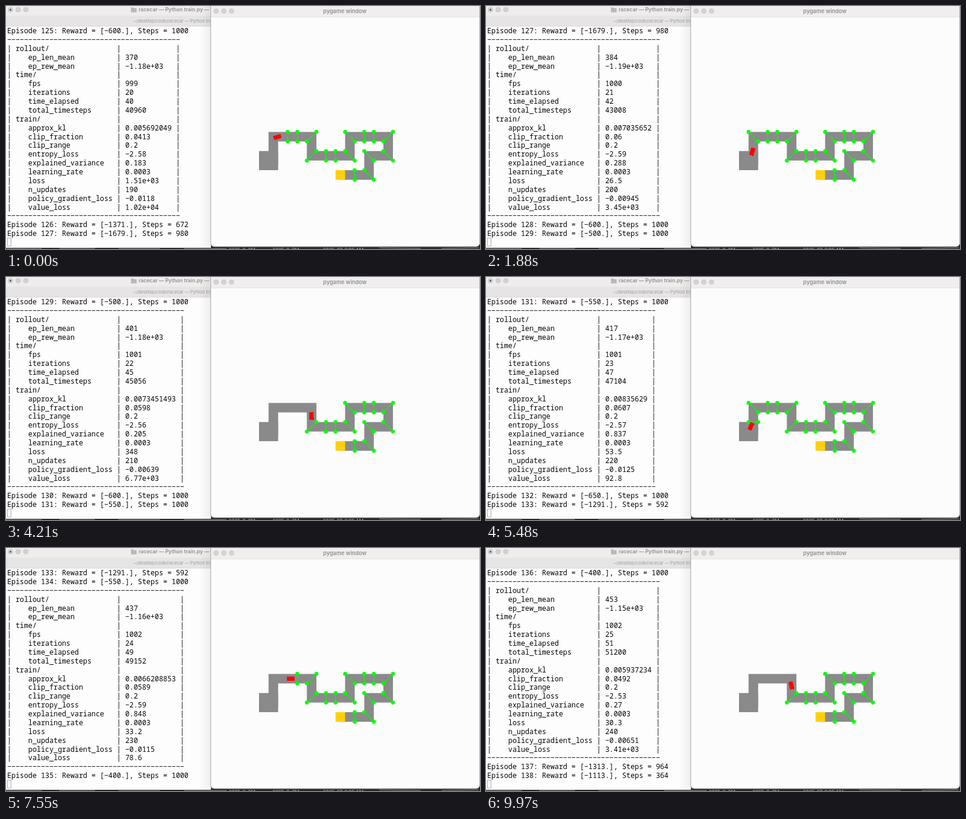
These frames come from a looping animation (800 by 410 pixels, 10000 ms). An HTML page:

```html
<!DOCTYPE html>
<html lang="en">
<head>
<meta charset="utf-8">
<title>Racecar training</title>
<style>
  html, body { margin: 0; width: 100%; height: 100%; overflow: hidden; background: #fdfdfd; }
  svg { position: absolute; left: 0; top: 0; width: 800px; height: 410px; }
  svg text { font-family: Inter, "Open Sans", sans-serif; }
  #term {
    position: absolute; left: 2px; top: 34.1px; margin: 0; width: 340px;
    font: 500 11.86px/14.87px "Noto Sans Mono", "DejaVu Sans Mono", monospace;
    color: #050505; white-space: pre;
  }
</style>
</head>
<body>
<svg viewBox="0 0 800 410">
  <defs>
    <linearGradient id="shade">
      <stop offset="0" stop-color="#000" stop-opacity="0"/>
      <stop offset="1" stop-color="#000" stop-opacity=".06"/>
    </linearGradient>
    <clipPath id="left"><rect width="346" height="410"/></clipPath>
  </defs>

  <!-- desktop behind the windows -->
  <rect width="800" height="410" fill="#29282b"/>
  <path d="M0 409.5H60M90 409H150M190 409.6H260M300 409.4H372M630 408L700 409M735 409L798 408" fill="none" stroke="#8b898c"/>
  <text y="414" font-size="8" fill="#bbb">
    <tspan x="376">2025-0..0M</tspan><tspan x="450">2025-0..0M</tspan><tspan x="535">2025-07..2:05 AM</tspan>
  </text>

  <!-- terminal window -->
  <g clip-path="url(#left)">
    <path d="M0 0H346V408H0Z" fill="#fdfdfd"/>
    <rect width="346" height="34" fill="#eeecec"/>
    <rect y="16.5" width="346" height="17" fill="#e6e4e4"/>
    <path d="M0 34H346" stroke="#d4d2d2"/>
    <g fill="#d2d0d0" stroke="#bebcbc" stroke-width=".6">
      <circle cx="7.5" cy="6.2" r="4"/><circle cx="20.4" cy="6.2" r="4"/><circle cx="33.4" cy="6.2" r="4"/>
    </g>
    <circle cx="7.5" cy="6.2" r="1.5" fill="#555"/>
    <path d="M211 2.5h4l1 1.2h4.5v7H211z" fill="#b9b7b7"/>
    <text x="224" y="9.4" font-size="8.6" font-weight="600" fill="#908e8e">racecar — Python train.py — 80×25</text>
    <text x="215" y="27.6" font-size="7.35" fill="#9b9999">~/desktop/code/racecar — Python train.py</text>
    <rect x="326" width="20" height="408" fill="url(#shade)"/>
    <rect x="2.5" y="391.5" width="6" height="13.5" fill="none" stroke="#aaa"/>
  </g>

  <!-- game window -->
  <rect x="345.5" y="-8" width="454" height="414" rx="6" fill="#fcfcfc" stroke="#a9a7a7"/>
  <path d="M346 0H799V18.5H346Z" fill="#f0eeee"/>
  <path d="M346 18.5H799" stroke="#dddbdb" stroke-width=".8"/>
  <g fill="#d4d2d2" stroke="#c2c0c0" stroke-width=".6">
    <circle cx="354.6" cy="8.6" r="4"/><circle cx="367.6" cy="8.6" r="4"/><circle cx="380.6" cy="8.6" r="4"/>
  </g>
  <text x="572" y="11.8" font-size="9.3" font-weight="600" text-anchor="middle" fill="#918f8f">pygame window</text>
  <path id="road" fill="none" stroke="#8a8a8a" stroke-width="16.15"/>
  <rect x="427" y="244.7" width="32.3" height="32.3" fill="#8a8a8a"/>
  <rect x="556.2" y="277" width="16.15" height="16.15" fill="#ffd00a"/>
  <path id="line" fill="none"/>
  <g id="gates" fill="#0f0"></g>
  <rect id="car" x="-6.5" y="-3.6" width="13" height="7.2" fill="#f00" shape-rendering="crispEdges"/>
</svg>
<pre id="term"></pre>

<script>
const LOOP = 10000, ROWS = 24, ROLLOUT = 2048, CELL = 16.15;
const $ = id => document.getElementById(id);
const toPx = ([c, r]) => [427 + c * CELL, 212.4 + r * CELL];
const along = (a, b, d) => {
  const k = d / Math.hypot(b[0] - a[0], b[1] - a[1]);
  return [a[0] + (b[0] - a[0]) * k, a[1] + (b[1] - a[1]) * k];
};

// cell centres where the road turns, from start to goal
const turns = [[1, 3], [1, 0], [5, 0], [5, 2], [9, 2], [9, 0], [13, 0], [13, 2], [11, 2], [11, 4], [8, 4]]
  .map(p => p.map(v => v + .5));
$("road").setAttribute("d", "M" + turns.map(toPx).join("L"));

// the car leaves the middle of the start block and rounds each turn
const route = [[1, 3], [1.5, 1.9], ...turns.slice(1)];
const dist = (a, b) => Math.hypot(a[0] - b[0], a[1] - b[1]);
let d = "M" + toPx(route[0]);
for (let i = 1; i < route.length - 1; i++) {
  const [a, b, c] = route.slice(i - 1, i + 2);
  const r = Math.min(1, dist(a, b) / 2, dist(b, c) / 2);
  d += `L${toPx(along(b, a, r))}Q${toPx(b)} ${toPx(along(b, c, r))}`;
}
const line = $("line");
line.setAttribute("d", d + "L" + toPx(route.at(-1)));

// where the driving line comes closest to a point
function nearest([x, y]) {
  let best = 0, min = Infinity;
  for (let s = 0; s < line.getTotalLength(); s++) {
    const p = line.getPointAtLength(s), gap = Math.hypot(p.x - x, p.y - y);
    if (gap < min) [best, min] = [s, gap];
  }
  return best;
}

// a gate crosses the road at (c, r); (dc, dr) is half its span
const gates = [];
function addGate(c, r, dc, dr) {
  const a = toPx([c - dc, r - dr]), b = toPx([c + dc, r + dr]);
  const node = document.createElementNS("http://www.w3.org/2000/svg", "g");
  node.innerHTML = `<path d="M${a}L${b}" stroke="#0f0" stroke-width="1.2"/>` +
    [a, b].map(([x, y]) => `<circle cx="${x}" cy="${y}" r="3.3"/>`).join("");
  $("gates").append(node);
  gates.push({ node, at: nearest(toPx([c, r])) });
}
for (let i = 0; i < turns.length - 1; i++) {
  const [a, b, next] = turns.slice(i, i + 3), len = dist(a, b);
  const [dc, dr] = along([0, 0], [b[0] - a[0], b[1] - a[1]], 1);
  for (let k = 1.5; k < len - 1; k++) addGate(a[0] + dc * k, a[1] + dr * k, dr / 2, dc / 2);
  if (next) {
    const [nc, nr] = along([0, 0], [next[0] - b[0], next[1] - b[1]], 1);
    addGate(...b, (dc - nc) / 2, (dr - nr) / 2);
  }
}

// policy updates, in ms: stepping stops between rollouts
const pauses = [[-1400, -1296], [600, 700], [2640, 2790], [4730, 4850], [6600, 6700], [8640, 8910], [10807, 10900]];
function stepAt(t) {
  const i = pauses.findIndex(p => t < p[1]);
  const from = pauses[i - 1][1], to = pauses[i][0];
  return (i - 1 + Math.min(1, (t - from) / (to - from))) * ROLLOUT;
}

// reward, steps, how strongly the car slows down
const episodes = [
  [-600, 1000, 1.68], [-500, 1000, 1.3], [-600, 1000, 1.76], [-550, 1000, 1.3], [-650, 1000, 2.82], [-1291, 592, 1],
  [-550, 1000, 1], [-400, 1000, .94], [-400, 1000, 1], [-1313, 964, 1], [-1113, 364, 1], [-250, 1000, 1.52]];

const keys = "rollout/ ep_len_mean ep_rew_mean time/ fps iterations time_elapsed total_timesteps train/ approx_kl clip_fraction clip_range entropy_loss explained_variance learning_rate loss n_updates policy_gradient_loss value_loss".split(" ");
// len, reward, fps, elapsed, kl, clip, entropy, variance, loss, policy loss, value loss
const runs = [
  "370 -1.18e+03 999 40 0.005692049 0.0413 -2.58 0.183 1.51e+03 -0.0118 1.02e+04",
  "384 -1.19e+03 1000 42 0.007035652 0.06 -2.59 0.288 26.5 -0.00945 3.45e+03",
  "401 -1.18e+03 1001 45 0.0073451493 0.0598 -2.56 0.205 348 -0.00639 6.77e+03",
  "417 -1.17e+03 1001 47 0.00835629 0.0607 -2.57 0.837 53.5 -0.0125 92.8",
  "437 -1.16e+03 1002 49 0.0066208853 0.0589 -2.59 0.848 33.2 -0.0115 78.6",
  "453 -1.15e+03 1002 51 0.005937234 0.0492 -2.53 0.27 30.3 -0.00651 3.41e+03"];

function table(run, i) {
  const [len, rew, fps, secs, kl, clip, ent, varc, loss, pol, val] = run.split(" ");
  const n = 20 + i;
  const vals = ["", len, rew, "", fps, n, secs, n * ROLLOUT, "", kl, clip, "0.2", ent, varc, "0.0003", loss,
    (n - 1) * 10, pol, val].map(String);
  const w = Math.max(...vals.map(v => v.length));
  const rule = "-".repeat(30 + w);
  const rows = keys.map((k, j) =>
    "| " + ((k.endsWith("/") ? "" : "   ") + k).padEnd(24) + "| " + vals[j].padEnd(w) + " |");
  return [rule, ...rows, rule];
}
const result = (n, reward, steps) => `Episode ${n}: Reward = [${reward}.], Steps = ${steps}`;

// everything printed, with the step at which it appears
const log = [[0, [result(125, -600, 1000), ...table(runs[0], 0), result(126, -1371, 672), result(127, -1679, 980)]]];
runs.forEach((r, i) => i && log.push([i * ROLLOUT, table(r, i)]));
let start = 1240;
const races = episodes.map(([reward, steps, slow], i) => {
  // every step costs 1, a crash 1000, and a gate earns 50
  const cleared = Math.round((reward + steps + (steps < 1000 ? 1000 : 0)) / 50);
  const reach = (gates[cleared - 1].at + gates[cleared].at) / 2;
  const race = { start, steps, reach, slow };
  start += steps;
  log.push([start, [result(128 + i, reward, steps)]]);
  return race;
});
log.sort((a, b) => a[0] - b[0]);

let printed = 0;
function draw() {
  const step = stepAt(performance.now() % LOOP);
  const shown = log.filter(e => e[0] <= step);
  if (shown.length !== printed) {
    printed = shown.length;
    const text = shown.flatMap(e => e[1]).slice(-ROWS).join("\n");
    $("term").textContent = text.replace(/-/g, "\u2212");
  }
  const race = races.findLast(r => r.start <= step);
  const s = race.reach * (1 - (1 - (step - race.start) / race.steps) ** race.slow);
  const p = line.getPointAtLength(s), back = line.getPointAtLength(Math.max(0, s - 1)), front = line.getPointAtLength(s + 1);
  const angle = Math.atan2(front.y - back.y, front.x - back.x) * 180 / Math.PI;
  $("car").setAttribute("transform", `translate(${p.x} ${p.y}) rotate(${angle})`);
  gates.forEach(g => g.node.style.display = s + 3 >= g.at ? "none" : "");
  requestAnimationFrame(draw);
}
draw();
</script>
</body>
</html>
```
